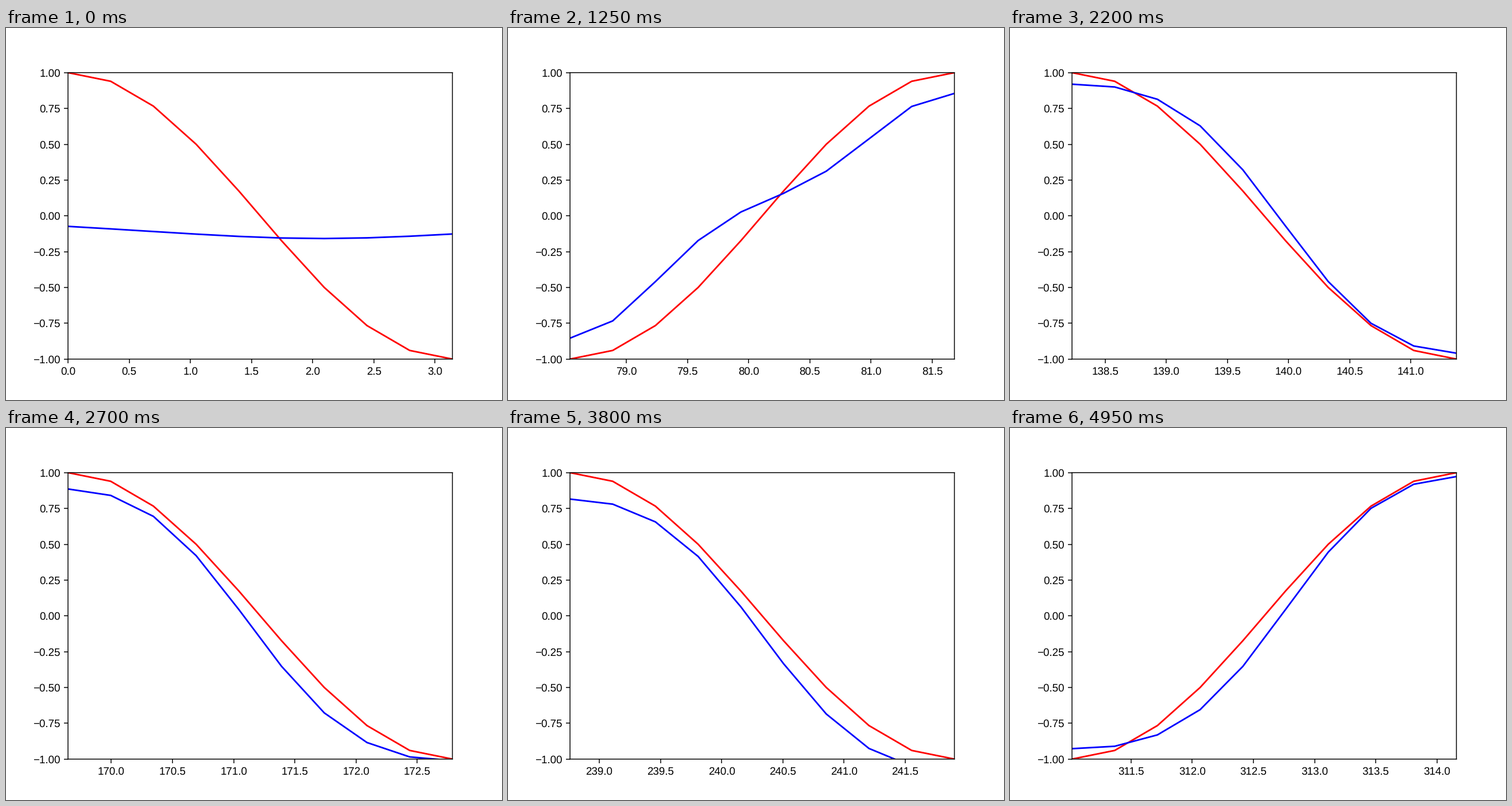
Animation of 864 by 648 pixels, one loop 5 s. Source, as a matplotlib script:

```python
import numpy as np
import matplotlib.pyplot as plt
from matplotlib.animation import FuncAnimation
from matplotlib.ticker import MultipleLocator

STEPS = 100
POINTS = 10

plt.rcParams.update({
    "font.family": "Liberation Sans",
    "text.hinting": "none",
    "path.snap": False,
})


def bump(step, center, width):
    return np.exp(-((step - center) / width) ** 2)


def prediction(step):
    """Network output over one half period, learning to follow the cosine."""
    t = np.linspace(0, np.pi, POINTS)
    gain = 1 / (1 + np.exp((19.5 - step) / 5.5))
    ripple = 0.16 * bump(step, 25, 5) - 0.05 * gain
    lag = 0.06 + 0.14 * np.cos(2 * np.pi * (step - 11) / 28)
    drift = -0.14 * bump(step, 72, 20)

    wave = gain * np.cos(t) + ripple * np.cos(3 * t)
    wave += lag * (np.sin(t) - 0.25 * gain * np.sin(3 * t)) + drift
    bias = -0.1 * np.exp(-step / 3)
    return bias + (-1) ** step * wave


fig, ax = plt.subplots(figsize=(6.4, 4.8), dpi=135)
ax.set_ylim(-1, 1)
ax.xaxis.set_major_locator(MultipleLocator(0.5))
ax.yaxis.set_major_locator(MultipleLocator(0.25))
ax.xaxis.set_major_formatter("{x:.1f}")
target_line, = ax.plot([], [], "r-")
predicted_line, = ax.plot([], [], "b-")


def draw(step):
    x = np.linspace(step * np.pi, (step + 1) * np.pi, POINTS)
    target_line.set_data(x, np.cos(x))
    predicted_line.set_data(x, prediction(step))
    ax.set_xlim(x[0], x[-1])
    return target_line, predicted_line


anim = FuncAnimation(fig, draw, frames=STEPS, init_func=lambda: draw(0),
                     interval=50, repeat=True, repeat_delay=0, blit=False)
plt.show()
```
